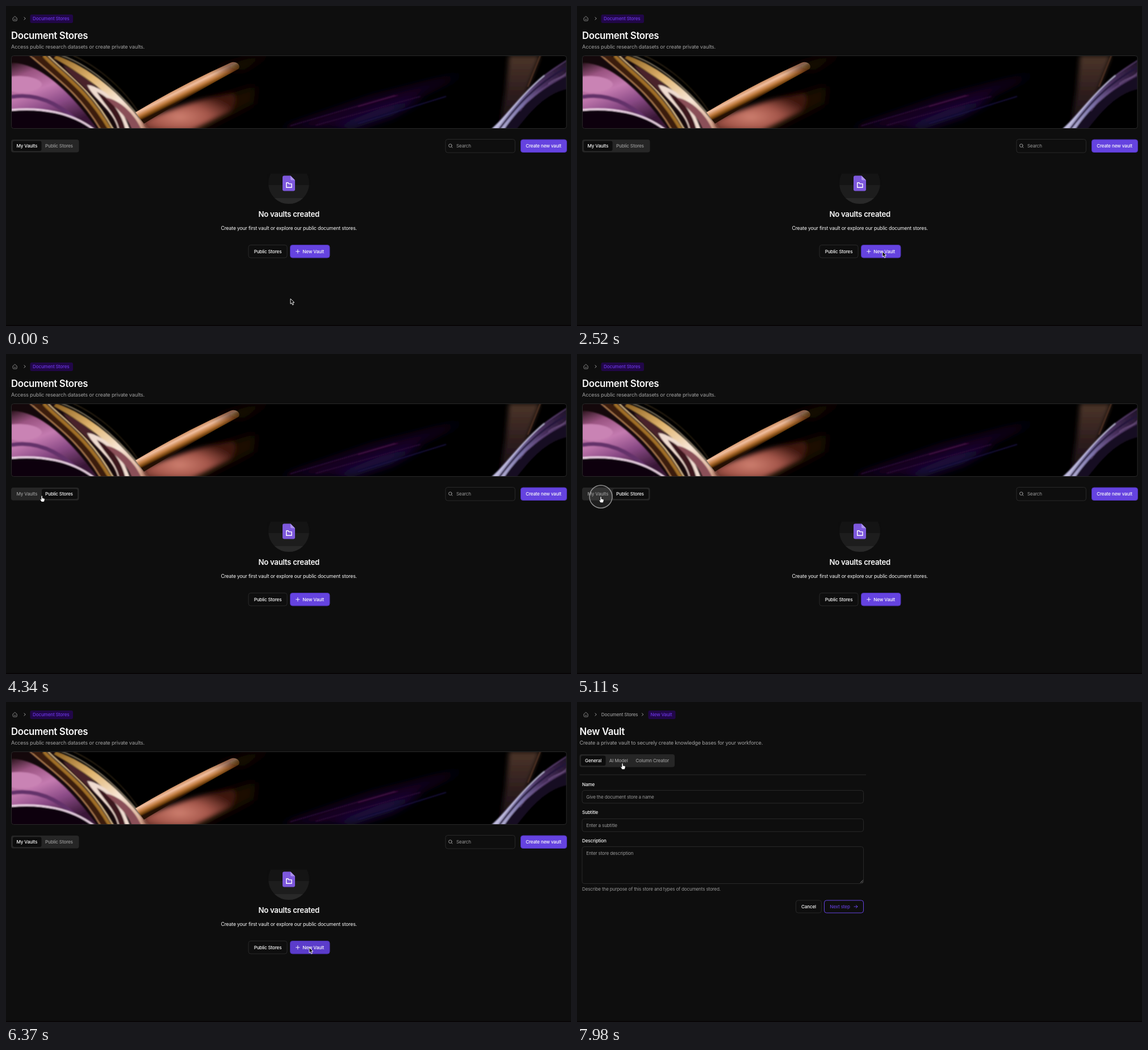
An HTML page for the animation above (8 s loop, 995 px wide and 563 px high).

```html
<!DOCTYPE html>
<html lang="en">
<head>
<meta charset="utf-8">
<title>Document Stores</title>
<style>
  html, body { margin: 0; width: 100%; height: 100%; overflow: hidden; background: #0e0e0e; }
  svg { display: block; width: 995px; height: 563px; }
  text { font: 500 8.1px Inter, sans-serif; letter-spacing: -.02em; fill: #fafafa; white-space: pre; }
  .h1 { font-size: 16.8px; font-weight: 600; }
  .h2 { font-size: 13.2px; font-weight: 600; }
  .sub { font-size: 9.17px; font-weight: 400; fill: #a1a1a1; }
  .dim { fill: #999; }
  .hint { font-weight: 400; fill: #999; }
  .pill { fill: #6a35e0; }
  .mid { text-anchor: middle; }
  .box { fill: none; stroke: #282828; }
  .tabs { fill: #262626; }
  .on { fill: #0d0d0d; }
  .cta { fill: #6543e0; stroke: #4a2fae; }
  .line { fill: none; stroke: #a1a1a1; stroke-linecap: round; stroke-linejoin: round; }
</style>
</head>
<body>
<svg viewBox="0 0 995 563">
  <defs>
    <clipPath id="frame"><rect x="9.5" y="87.5" width="977.5" height="128" rx="4"/></clipPath>
    <clipPath id="cut"><rect x="460" y="295" width="76" height="56"/></clipPath>
    <filter id="soft" x="-20%" y="-40%" width="140%" height="180%"><feGaussianBlur stdDeviation="1"/></filter>
    <filter id="haze" x="-20%" y="-40%" width="140%" height="180%"><feGaussianBlur stdDeviation="4"/></filter>
    <filter id="blur" x="-30%" y="-60%" width="160%" height="220%"><feGaussianBlur stdDeviation="8"/></filter>
    <linearGradient id="mauve" x1="0" y1="0" x2=".5" y2="1">
      <stop offset="0" stop-color="#2c141d"/><stop offset=".2" stop-color="#9c5583"/>
      <stop offset=".45" stop-color="#c47bb0"/><stop offset=".7" stop-color="#8a4a86"/>
      <stop offset="1" stop-color="#3a1837"/>
    </linearGradient>
    <linearGradient id="cream" x1="0" y1="0" x2="1" y2="1">
      <stop offset="0" stop-color="#8d611f"/><stop offset=".35" stop-color="#e0b46e"/>
      <stop offset=".65" stop-color="#f8e6d6"/><stop offset="1" stop-color="#d6a58c"/>
    </linearGradient>
    <linearGradient id="tube" gradientUnits="userSpaceOnUse" x1="311" y1="140" x2="321" y2="160">
      <stop offset="0" stop-color="#c98a5c"/><stop offset=".3" stop-color="#f0bd9e"/>
      <stop offset=".6" stop-color="#c17c40"/><stop offset=".85" stop-color="#70400c"/>
      <stop offset="1" stop-color="#241004"/>
    </linearGradient>
    <radialGradient id="salmon" cx=".4" cy=".62" r=".62">
      <stop offset="0" stop-color="#cf8070"/><stop offset=".5" stop-color="#a4564a"/>
      <stop offset="1" stop-color="#3c160f"/>
    </radialGradient>
    <linearGradient id="beam" x1="0" y1="0" x2="0" y2="1">
      <stop offset="0" stop-color="#4c3529"/><stop offset="1" stop-color="#120813"/>
    </linearGradient>
    <linearGradient id="lilac" x1="0" y1="1" x2="1" y2="0">
      <stop offset="0" stop-color="#bdbadd"/><stop offset=".35" stop-color="#7f76ad"/>
      <stop offset=".65" stop-color="#49305f"/><stop offset="1" stop-color="#1d0f25"/>
    </linearGradient>
  </defs>
  <rect width="995" height="563" fill="#0e0e0e"/>
  <rect y="561" width="995" height="2" fill="#080506"/>
  <g class="line">
    <path d="M12.2 21.2 15.7 18.2 19.2 21.2V25a1 1 0 0 1-1 1h-5a1 1 0 0 1-1-1ZM14.3 23.3q1.4 1.3 2.8 0" stroke-width=".8"/>
    <path d="m32 19.8 2.2 2.2-2.2 2.2"/>
  </g>

  <g id="stores">
    <rect x="42.5" y="15" width="75.5" height="15" rx="3" fill="#210748"/>
    <text x="47" y="25" class="pill">Document Stores</text>
    <text x="9" y="58" class="h1">Document Stores</text>
    <text x="9" y="75" class="sub">Access public research datasets or create private vaults.</text>

    <g clip-path="url(#frame)">
      <rect x="9" y="87" width="979" height="129" fill="#000"/>
      <path d="M9 87H92C150 115 200 165 249 216H9Z" fill="#14080b"/>
      <g filter="url(#soft)">
        <path d="M9 100C60 100 112 150 160 216H9Z" fill="url(#mauve)"/>
        <path d="M9 124C50 119 84 138 48 149 30 155 15 152 9 150Z" fill="#c983b4"/>
        <path d="M9 160C55 152 98 172 138 216" fill="none" stroke="#64306a" stroke-width="7"/>
        <path d="M9 183C60 178 112 186 152 216H9Z" fill="#0c050e"/>
        <path d="M9 183C62 178 115 187 154 217" fill="none" stroke="#f5dcee" stroke-width="3"/>
      </g>
      <g filter="url(#soft)" fill="none">
        <path d="M50 87C92 122 135 148 174 217" stroke="#3a1b0d" stroke-width="12"/>
        <path d="M66 87C98 120 142 146 183 217" stroke="#a06e26" stroke-width="6"/>
        <path d="M74 87C104 118 147 142 189 217" stroke="#f3d49a" stroke-width="2.5"/>
        <path d="M42 87C84 124 128 152 166 217" stroke="#c58d5a" stroke-width="2"/>
      </g>
      <g filter="url(#soft)">
        <path d="M88 87C145 105 205 155 249 216H235C195 165 145 125 84 92Z" fill="url(#cream)"/>
        <path d="M100 104C140 120 185 160 214 216H196C185 172 125 140 100 104Z" fill="#4a232a"/>
        <path d="M143 139C178 143 204 178 218 216H197C190 185 155 165 143 139Z" fill="#f0dcd0"/>
        <path d="M160 151C188 163 204 193 210 216H199C193 190 172 172 160 151Z" fill="#3b151c"/>
        <path d="M175 161C202 165 227 192 238 216H221C212 192 193 180 175 161Z" fill="#8a4f58"/>
        <path d="M98 87C155 107 210 160 252 217" fill="none" stroke="#f9e2b8" stroke-width="1.3"/>
        <path d="M118 87C165 108 208 147 234 188" fill="none" stroke="#68502f"/>
      </g>
      <path d="M300 184 440 140 436 172 350 216H250Z" fill="#1d0c04" filter="url(#blur)"/>
      <path d="M240 202C290 182 345 160 400 154 408 158 406 176 394 186L325 220H246Z" fill="url(#salmon)" filter="url(#haze)"/>
      <path d="M228 187Q310 138 395 100C406 95 415 105 409 111Q330 154 243 207Z" fill="url(#tube)"/>
      <g filter="url(#blur)">
        <path d="M480 216 640 161 810 118 700 171 560 216Z" fill="#180422"/>
        <path d="M570 216 660 180 735 161 680 193 610 216Z" fill="#1d1040"/>
        <path d="M360 112 470 80 420 112Z" fill="#1c0d03"/>
      </g>
      <g filter="url(#soft)" fill="none">
        <path d="M500 211 685 157M545 210 730 159" stroke="#2a0a36" stroke-width="2"/>
        <path d="M620 177 690 157" stroke="#5a1453"/>
        <path d="M620 207 775 159" stroke="#1a1040" stroke-width="2"/>
      </g>
      <path d="M886 87H940L910 170 868 216 880 150Z" fill="url(#beam)" filter="url(#haze)"/>
      <g filter="url(#soft)">
        <path d="M855 216C885 190 920 133 988 94V128C945 142 916 180 888 216Z" fill="url(#lilac)"/>
        <path d="M878 216C905 177 940 146 988 124V146C950 155 925 184 900 216Z" fill="#160a22"/>
        <path d="M861 216C890 182 914 150 948 122" fill="none" stroke="#cbc8e6" stroke-width="2"/>
        <path d="M869 216C898 178 928 141 987 108" fill="none" stroke="#22163a" stroke-width="3"/>
        <path d="M948 122 987 96M905 185C922 160 945 143 987 121" fill="none" stroke="#77588f"/>
        <path d="M941 87 919 142" fill="none" stroke="#5c3826" stroke-width="2"/>
        <path d="M955 137C967 127 977 128 988 117" fill="none" stroke="#8d6b9f"/>
      </g>
    </g>
    <rect x="9.500" y="87.500" width="977.500" height="128" rx="4" class="box"/>

    <rect x="9" y="235" width="119.500" height="22.500" rx="4" class="tabs"/>
    <rect id="tab" y="237.500" height="17.500" rx="3" class="on"/>
    <text id="mine" x="18.500" y="249">My Vaults</text>
    <text id="public" x="69" y="249">Public Stores</text>
    <rect x="774" y="234.500" width="122.500" height="23.500" rx="4" class="box"/>
    <path d="M784.600 247.600 786 249.200M785.200 245.600a2.800 2.800 0 1 1-5.600 0a2.800 2.800 0 1 1 5.600 0" class="line"/>
    <text x="793" y="249" class="hint">Search</text>
    <rect x="906.500" y="235" width="81" height="22.500" rx="4" class="cta"/>
    <text x="946.500" y="249" class="mid">Create new vault</text>

    <g clip-path="url(#cut)">
      <circle cx="498" cy="312" r="36" fill="#1d1d1d"/>
      <rect x="460" y="295" width="76" height="20" fill="#0e0e0e" opacity=".55"/>
      <path d="M473 338H523Q513 348 498 348T473 338" fill="#292929"/>
    </g>
    <path d="M490 298.500H501L509 306.500V322.500a3 3 0 0 1-3 3H490a3 3 0 0 1-3-3V301.500a3 3 0 0 1 3-3Z" fill="#7d58dc"/>
    <path d="M501 298.500 509 306.500H503a2 2 0 0 1-2-2Z" fill="#ab91ec"/>
    <path d="M493.700 311h3.300l1.300 1.900h4.700v6.300h-9.300Z" fill="none" stroke="#fff" stroke-width="1.400" stroke-linejoin="round"/>
    <text x="498.200" y="371" class="h2 mid">No vaults created</text>
    <text x="498.200" y="394.300" class="mid" style="font-size:8.700px;font-weight:400">Create your first vault or explore our public document stores.</text>
    <rect x="427" y="420.500" width="68" height="22.500" rx="4" class="box"/>
    <text x="461" y="434.700" class="mid">Public Stores</text>
    <rect id="new" x="500.500" y="420.500" width="69.500" height="22.500" rx="4" class="cta"/>
    <path d="M510.600 431.800h6.400M513.800 428.600v6.400" class="line" style="stroke:#fff" stroke-width=".9"/>
    <text x="522.300" y="434.700">New Vault</text>
  </g>

  <g id="form">
    <text x="42.800" y="25" class="dim">Document Stores</text>
    <path d="m114.500 19.800 2.200 2.200-2.200 2.200" class="line"/>
    <rect x="125.500" y="15" width="48" height="15" rx="3" fill="#210748"/>
    <text x="129.500" y="25" class="pill">New Vault</text>
    <text x="4.500" y="58" class="h1">New Vault</text>
    <text x="4.500" y="75" class="sub">Create a private vault to securely create knowledge bases for your workforce.</text>
    <rect x="4.500" y="92" width="167.500" height="22.500" rx="4" class="tabs"/>
    <rect x="7" y="94.500" width="43.500" height="17.500" rx="3" class="on"/>
    <text x="14" y="106">General</text>
    <text x="56.700" y="106" class="dim">AI Model</text>
    <text x="103.200" y="106" class="dim">Column Creator</text>
    <path d="M4.500 128H509" class="box"/>
    <text x="9" y="147.700">Name</text>
    <rect x="9" y="155.500" width="495.500" height="22.500" rx="4" class="box"/>
    <text x="16.300" y="170" class="hint">Give the document store a name</text>
    <text x="9" y="197.200">Subtitle</text>
    <rect x="9" y="205.500" width="495.500" height="22.500" rx="4" class="box"/>
    <text x="16.300" y="219.700" class="hint">Enter a subtitle</text>
    <text x="9" y="246.800">Description</text>
    <rect x="9" y="254.500" width="495.500" height="65" rx="4" class="box"/>
    <text x="16.300" y="268.700" class="hint">Enter store description</text>
    <path d="m499 318 4.500-4.500m-2 4.500 2-2" class="line" stroke-width=".7"/>
    <text x="9" y="332.200" class="hint">Describe the purpose of this store and types of documents stored.</text>
    <rect x="385.500" y="349" width="45" height="22" rx="4" class="box"/>
    <text x="408" y="362.800" class="mid">Cancel</text>
    <rect x="435.500" y="349" width="69" height="22" rx="4" class="box" style="stroke:#6543e0"/>
    <text x="445.200" y="362.800" style="fill:#5f3bd0">Next step</text>
    <path d="M488 360h6m-2.500-2.500 2.500 2.500-2.500 2.500" class="line" style="stroke:#6543e0"/>
  </g>

  <g id="cursor">
    <circle id="ring" r="20" fill="#888" fill-opacity=".13" stroke="#aaa" stroke-opacity=".8" stroke-width="1.500"/>
    <path id="arrow" d="M0 0V9.200L2.100 7.300 3.700 11 5.400 10.200 3.900 6.700H6.800Z" fill="#000" stroke="#fff" stroke-width=".9" stroke-linejoin="round"/>
    <path id="hand" d="M-1 .8q0-1 1-1t1 1V4l3 .6q1.300.3 1.100 1.600L4.500 9 3.500 10.500H-.5L-3 6.800q-.5-1.200.8-1L-1 6.700Z" fill="#fff" stroke="#000" stroke-width=".5"/>
  </g>
</svg>
<script>
const LOOP = 8000, STEP = 70;
const $ = id => document.getElementById(id);
const show = (id, on) => $(id).style.display = on ? "" : "none";

// Pointer tip: [ms, x, y]
const path = [
  [0, 501, 515], [700, 547, 491], [770, 547, 491], [1050, 535, 431], [1260, 535, 431], [1400, 539, 431],
  [2450, 539, 431], [2520, 538, 432], [2730, 241, 317], [2800, 241, 317], [3150, 104, 240],
  [3570, 104, 240], [3780, 100, 245], [4130, 100, 245], [4480, 43, 252], [4620, 43, 252], [4760, 42, 251],
  [5390, 42, 251], [5600, 507, 413], [5670, 507, 413], [6160, 534, 432],
  [6860, 534, 432], [7210, 291, 155], [7280, 291, 155], [7980, 80, 108]
];
// Click rings: [start, end, radius]
const clicks = [[3290, 3500, 15], [3780, 4060, 20], [5110, 5180, 20], [6160, 6370, 20]];

function pointer(t) {
  const i = path.findIndex(p => p[0] > t);
  if (i < 0) return path.at(-1).slice(1);
  const [t0, x0, y0] = path[i - 1], [t1, x1, y1] = path[i];
  const u = (t - t0) / (t1 - t0), k = u * u * (3 - 2 * u);
  return [x0 + (x1 - x0) * k, y0 + (y1 - y0) * k];
}

function draw(t) {
  const [x, y] = pointer(t);
  const form = t >= 6440, onPublic = t >= 3920 && t < 5180;
  const hand = form ? x < 172 && y < 115 : x < 128 && y < 258;
  const click = clicks.find(([a, b]) => t >= a && t < b);

  show("stores", !form);
  show("form", form);
  $("tab").setAttribute("x", onPublic ? 63 : 12);
  $("tab").setAttribute("width", onPublic ? 63 : 50.5);
  $("mine").setAttribute("class", onPublic ? "dim" : "");
  $("public").setAttribute("class", onPublic ? "" : "dim");
  $("new").style.fill = t >= 5880 ? "#5b3cca" : "";

  $("cursor").setAttribute("transform", `translate(${x} ${y})`);
  show("arrow", !hand);
  show("hand", hand);
  show("ring", click);
  if (click) {
    const [start, end, r] = click;
    $("ring").setAttribute("r", r);
    $("ring").style.opacity = Math.min(1, (end - t) / Math.min(140, end - start));
  }
}

function tick() {
  const t = performance.now() % LOOP;
  draw(Math.floor(t / STEP) * STEP);
  requestAnimationFrame(tick);
}
tick();
</script>
</body>
</html>
```
